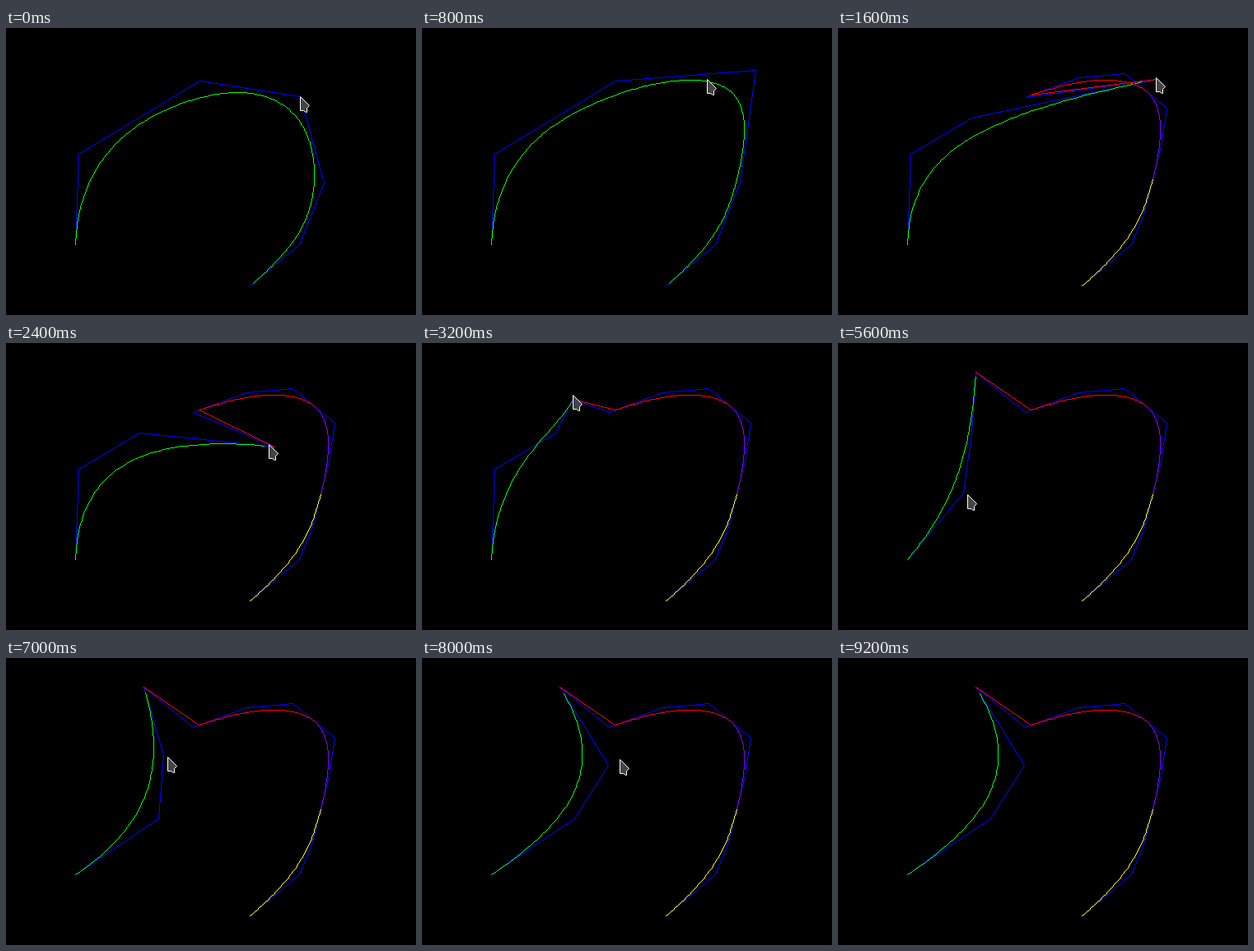
An HTML page with a canvas that plays this animation: 498x349 px, repeating every 9300 ms.

```html
<!DOCTYPE html>
<html>
<head>
<meta charset="utf-8">
<style>
html, body { margin: 0; width: 100%; height: 100%; overflow: hidden; background: #000; }
canvas { display: block; }
</style>
</head>
<body>
<canvas id="stage" width="498" height="349"></canvas>
<script>
const ctx = document.getElementById('stage').getContext('2d');
const LOOP = 9300, STEP = 100, LAG = 40, SPLIT = 1100;

const mix = (p, q, k) => p.map((v, i) => v + (q[i] - v) * k);
const mid = (p, q) => mix(p, q, 0.5);

// Fixed control points of the cubic B-spline, and the end positions of its third one
const start = [84, 263], p1 = [88, 153], p2 = [235, 64];
const p4 = [386, 188], p5 = [356, 263], end = [296, 313];
const p3Start = [357, 83], p3End = [405, 51];

// Handles that knot insertion creates, and where they are dragged
const cStart = mid(p1, p2), cEnd = [226, 130];
const dStart = mid(cStart, mix(p2, p3End, 1 / 3)), dRest = [338, 130], dEnd = [167, 35];
const bEnd = [185, 195];

// Pointer stops
const stops = [
  [0, p3Start], [400, [427, 44]], [700, p3End],
  [1000, dStart], [1150, dStart], [1500, [386, 64]], [1600, [386, 60]], [1800, [427, 42]],
  [2100, dRest], [2300, dRest], [3100, [184, 76]], [3200, [183, 63]], [3500, dEnd], [3600, dEnd],
  [4300, [150, 108]], [4900, p1], [5000, p1], [5600, [157, 184]], [6200, bEnd],
  [6600, cStart], [6700, cStart], [7000, [196, 120]], [7900, cEnd],
  [8700, [336, 76]], [9200, [55, 0]]
];

function pointer(t) {
  const i = Math.max(1, stops.findIndex(([time]) => time >= t));
  const [[t0, p], [t1, q]] = stops.slice(i - 1, i + 1);
  return mix(p, q, (t - t0) / (t1 - t0));
}

// A handle trails the pointer slightly, and only while it is held.
const dragged = (t, from, to) => t >= to ? pointer(to) : pointer(Math.max(from, t - LAG));

function line(p, q) {
  const [x, y] = p.map(Math.round), [x2, y2] = q.map(Math.round);
  const count = Math.max(Math.abs(x2 - x), Math.abs(y2 - y), 1);
  for (let i = 0; i <= count; i++) {
    const pixel = mix([x, y], [x2, y2], i / count).map(Math.round);
    ctx.fillRect(...pixel, 1, 1);
  }
}

function polyline(points, color) {
  ctx.fillStyle = color;
  points.slice(1).forEach((p, i) => line(points[i], p));
}

function bezier(points, u) {
  while (points.length > 1) points = points.slice(1).map((p, i) => mix(points[i], p, u));
  return points[0];
}

const sample = (points, from = 0, to = 1, count = 60) =>
  Array.from({ length: count + 1 }, (_, i) => bezier(points, from + (to - from) * i / count));

function drawPointer([x, y]) {
  ctx.save();
  ctx.translate(Math.round(x) + 0.5, Math.round(y) + 0.5);
  ctx.fillStyle = '#444';
  ctx.strokeStyle = '#fff';
  const shape = new Path2D('M0 0V17H4L7 19H8V14L11 11Z');
  ctx.fill(shape);
  ctx.stroke(shape);
  ctx.restore();
}

function draw(t) {
  const split = t >= SPLIT;
  const p3 = dragged(t, 0, 700);
  const f = mix(p2, p3, 1 / 3), g = mix(p2, p3, 2 / 3), h = mix(p3, p4, 1 / 3);
  const e = mid(cStart, f), i = mid(h, p4), j = mid(p4, p5);
  const knot2 = mid(g, h), knot3 = mid(i, j);

  const b = split ? dragged(t, 5000, 6200) : p1;
  const c = split ? dragged(t, 6700, 7900) : cStart;
  const d = split ? dragged(t, 1150, 3600) : e;

  const first = [start, b, c, d], second = [e, f, g, knot2];
  const third = [knot2, h, i, knot3], fourth = [knot3, j, p5, end];

  ctx.fillStyle = '#000';
  ctx.fillRect(0, 0, 498, 349);

  if (split) {
    polyline([...first, e, f, g, h, i, j, p5, end], '#00f');
    polyline(sample(first, 0, 0.973), '#0f0');
    polyline([d, ...sample(second, 0.04)], '#f00');
    polyline(sample(third), '#8000ff');
    polyline(sample(fourth), '#ff0');
  } else {
    polyline([start, p1, p2, p3, p4, p5, end], '#00f');
    [first, second, third].forEach(s => polyline(sample(s), '#0f0'));
    polyline(sample(fourth, 0, 0.978), '#0f0');
  }

  if (t < 9200) drawPointer(pointer(t));
}

function frame() {
  const t = performance.now() % LOOP;
  draw(Math.floor(t / STEP) * STEP);
  requestAnimationFrame(frame);
}
frame();
</script>
</body>
</html>
```
